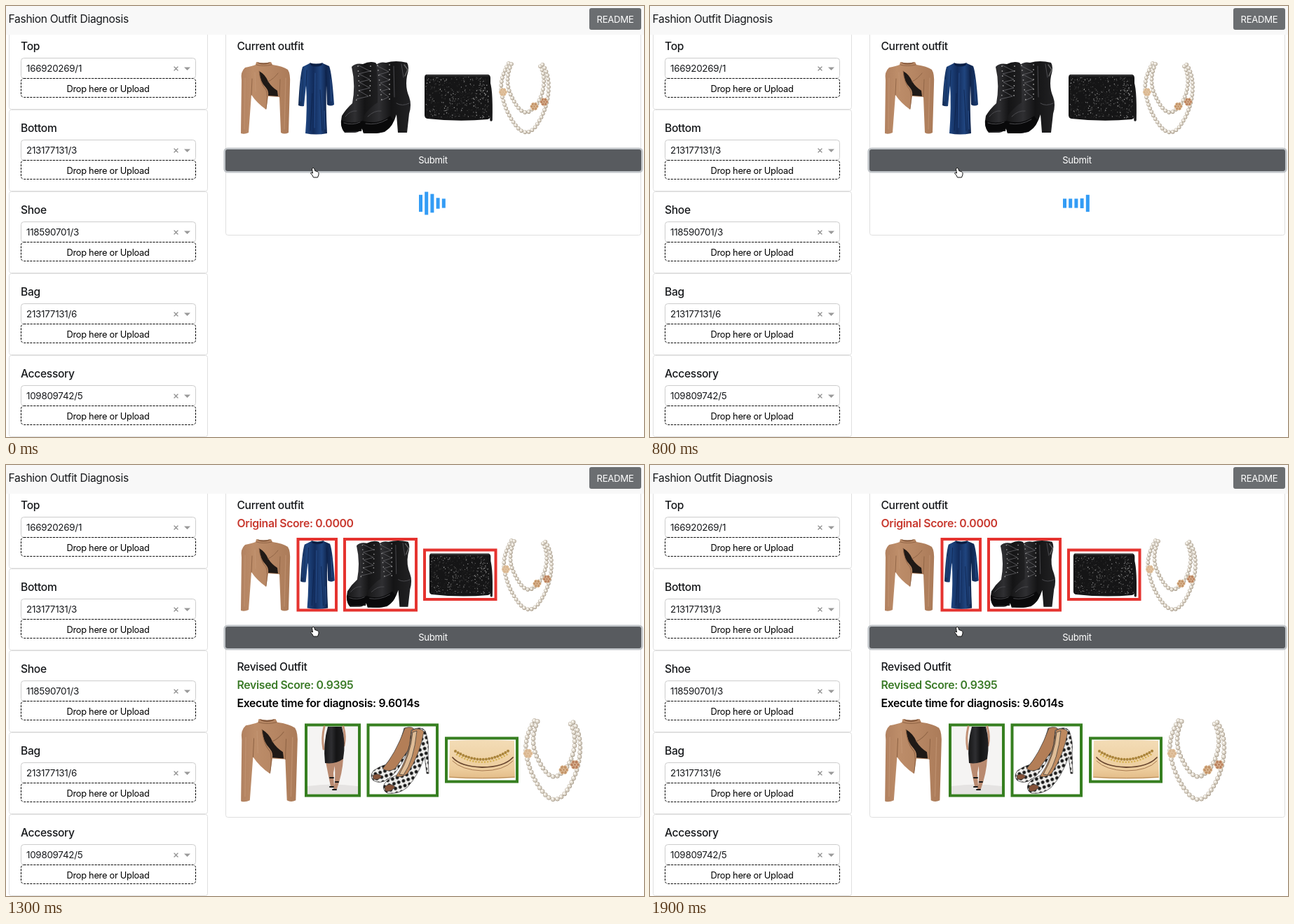
These frames come from a looping animation (910x616 px, 2 s). An HTML page:

```html
<!DOCTYPE html>
<html lang="en">
<head>
<meta charset="utf-8">
<title>Fashion Outfit Diagnosis</title>
<style>
  html, body { margin: 0; width: 100%; height: 100%; overflow: hidden; background: #fff; }
  svg { display: block; }
  text { font: 13.1px Inter, Roboto, sans-serif; letter-spacing: -.02em; fill: #16181b; }
  .title { font-size: 15.6px; }
  .head { font-size: 15.6px; font-weight: 500; }
  .score { font-size: 15.8px; font-weight: 600; }
  .value { font-size: 13.4px; }
  .light { fill: #fff; text-anchor: middle; }
  .mid { font-size: 12.8px; text-anchor: middle; fill: #000; }
  .card { fill: #fff; stroke: #dfdfdf; }
  .line { fill: none; stroke-linecap: round; stroke-linejoin: round; }
  .bead { fill: none; stroke-linecap: round; stroke-dasharray: 0 5.6; }
  .bad, .good { fill: #fff; stroke: #e5332f; stroke-width: 4; }
  .good { stroke: #367f20; }
</style>
</head>
<body>
<svg width="910" height="616" viewBox="0 0 910 616">
  <defs>
    <linearGradient id="camel">
      <stop offset="0" stop-color="#b18160"/><stop offset=".25" stop-color="#bd8d69"/>
      <stop offset=".6" stop-color="#b68663"/><stop offset="1" stop-color="#ab7b59"/>
    </linearGradient>
    <linearGradient id="velvet">
      <stop offset="0" stop-color="#10284f"/><stop offset=".2" stop-color="#1f4681"/>
      <stop offset=".42" stop-color="#122c5c"/><stop offset=".62" stop-color="#20457f"/>
      <stop offset=".78" stop-color="#10264f"/><stop offset="1" stop-color="#193a70"/>
    </linearGradient>
    <linearGradient id="leather">
      <stop offset="0" stop-color="#151516"/><stop offset=".35" stop-color="#2f2f32"/>
      <stop offset=".6" stop-color="#141415"/><stop offset="1" stop-color="#222224"/>
    </linearGradient>
    <linearGradient id="tan" x2="0" y2="1">
      <stop offset="0" stop-color="#f3dcb6"/><stop offset=".75" stop-color="#edcd9d"/>
      <stop offset="1" stop-color="#e3bb87"/>
    </linearGradient>
    <pattern id="dots" width="10" height="10" patternUnits="userSpaceOnUse" patternTransform="rotate(28)">
      <rect width="10" height="10" fill="#efeeec"/>
      <circle cx="2.5" cy="2.5" r="2.4" fill="#171717"/><circle cx="7.5" cy="7.5" r="2.4" fill="#171717"/>
    </pattern>

    <g id="jacket">
      <path fill="url(#camel)" d="M357 80Q367 83 378 80L380 84Q395 86 402 91Q406 97 405 112L403 181Q397 184 392 181L390 130L374 129L371 148Q358 139 350 127L346 181Q340 184 335 182L336 106Q334 94 341 88Q351 86 356 84Z"/>
      <path fill="#1f1916" d="M361 93Q370 98 374 108Q379 116 387 121L388 129L374 128Q375 122 371 117Q362 108 361 93Z"/>
      <path class="line" stroke="#8e6344" stroke-width=".9" d="M357 84Q367 87 379 84M361 93Q363 112 371 120Q374 127 371 147M350 127L351 104M390 130L391 105M374 108Q382 104 388 96"/>
      <path class="line" stroke="#c79a78" stroke-width="1.2" opacity=".6" d="M341 103L340 176M399 103L397 176M355 95L356 122"/>
      <path fill="#85593c" d="M358 80Q367 83 377 80L375 82Q367 85 360 82Z"/>
    </g>

    <g id="dress">
      <path fill="url(#velvet)" d="M433 82Q442 85 452 82L461 86Q465 96 468 141Q463 144 458 141L457 113Q456 145 458 182Q442 185 427 182Q430 145 428 113L425 143Q421 144 417 142Q419 100 423 87Z"/>
      <path fill="#0b1f45" d="M433 81Q442 84 452 81L450 85Q442 88 435 85Z"/>
      <path class="line" stroke="#0b1f45" opacity=".7" d="M429 92L428 115M456 92L457 115M437 125L434 178M448 120L451 178"/>
      <path class="line" stroke="#3563a8" opacity=".6" d="M441 96L440 174M421 105L420 136M463 105L464 136M454 150L455 176"/>
    </g>

    <g id="boots">
      <path fill="url(#leather)" d="M493 87Q498 81 509 83Q519 78 527 81L534 90L534 150L513 167Q507 180 498 181H483Q476 173 479 157Q485 147 494 139Q499 112 493 87Z"/>
      <path fill="url(#leather)" d="M528 84Q534 79 542 81Q556 77 572 81Q576 87 572 100Q569 116 575 130Q579 141 575 154L572 181H559L557 155Q552 172 540 180Q524 184 510 180Q506 168 510 157Q521 143 530 138Q531 110 528 84Z"/>
      <path fill="#09090a" d="M478 163Q490 170 509 164L507 179H482Q477 173 478 163ZM508 164Q530 171 548 157L553 164Q548 180 528 182H510Q506 173 508 164Z"/>
      <path class="line" stroke="#5e5e62" stroke-width=".9" d="M503 85L519 93L503 97L519 105L504 109L519 117L503 121L517 129L500 133M530 86L546 94L532 98L547 106L534 110L547 118L535 122L546 130L535 135"/>
      <path class="line" stroke="#999" stroke-width="1.8" stroke-dasharray="0 7" d="M502 86L504 120L499 137M520 86L519 132M530 85L536 135M547 84L547 134"/>
      <path class="line" stroke="#4c4c50" stroke-width="1" d="M484 158Q491 149 500 150M516 158Q525 149 535 150M557 139Q565 144 575 139M553 86L554 130M564 83L567 102M482 167Q494 171 505 166M513 168Q529 171 544 162"/>
      <path class="line" stroke="#666" stroke-width="1.5" d="M568 84L573 91L569 100"/>
    </g>

    <g id="bag">
      <path class="line" stroke="#19191a" stroke-width="3.5" d="M688 108Q693 115 692 163"/>
      <path fill="#151516" d="M599 98H688Q691 99 691 103V157Q691 161 687 162Q645 166 601 161Q597 160 597 156V102Q597 99 599 98Z"/>
      <g id="glitter"></g>
      <path class="line" stroke="#484849" d="M600 99.500H688"/>
    </g>

    <g id="necklace">
      <g id="strands">
        <path class="bead" d="M717 82Q702 106 708 130Q714 155 729 173Q742 188 755 173Q775 145 774 112Q773 92 763 81"/>
        <path class="bead" d="M721 83Q710 107 721 129Q734 157 746 151Q763 140 767 114Q769 94 759 82"/>
      </g>
      <g id="flowers"></g>
    </g>

    <g id="submit">
      <rect x="310.400" y="202.400" width="598.200" height="36.200" rx="5.500" fill="#c0c4c8"/>
      <rect x="313" y="205" width="593" height="31" rx="3" fill="#585b5f"/>
      <text class="light" x="609" y="225">Submit</text>
    </g>
  </defs>

  <g id="fields"></g>

  <g id="loading">
    <rect class="card" x="313.5" y="30.5" width="592" height="297" rx="3"/>
    <use href="#jacket"/><use href="#dress"/><use href="#boots"/><use href="#bag"/><use href="#necklace"/>
    <use href="#submit"/>
    <g id="bars" fill="#339cf5"></g>
  </g>

  <g id="result" visibility="hidden">
    <rect class="card" x="313.5" y="30.5" width="592" height="473" rx="3"/>
    <text class="score" x="329.5" y="89" style="fill:#c8382e">Original Score: 0.0000</text>
    <rect class="bad" x="416.5" y="106" width="54.5" height="101.500"/>
    <rect class="bad" x="483" y="106" width="102" height="101.500"/>
    <rect class="bad" x="597" y="121.500" width="101.500" height="70.500"/>
    <use href="#jacket" y="26"/>
    <use href="#dress" transform="translate(21.8 30.6) scale(.955)"/>
    <use href="#boots" transform="translate(41.5 34.5) scale(.93)"/>
    <use href="#bag" transform="translate(48.7 35.3) scale(.93)"/>
    <use href="#necklace" x="4" y="26"/>
    <use href="#submit" y="26"/>

    <text class="head" x="329.5" y="294">Revised Outfit</text>
    <text class="score" x="329.5" y="320" style="fill:#3b7b28">Revised Score: 0.9395</text>
    <text class="score" x="329.5" y="346" style="fill:#000">Execute time for diagnosis: 9.6014s</text>
    <use href="#jacket" transform="translate(-50.1 271.1) scale(1.15)"/>

    <rect class="good" x="428" y="371.5" width="76" height="101"/>
    <rect x="430" y="374" width="72" height="96" fill="#f5f4f3"/>
    <path fill="#e5e3e2" d="M430 459Q465 454 502 459V470H430Z"/>
    <path class="line" stroke="#c29176" stroke-width="3" d="M454 374Q450 390 453 406M481 374Q485 388 482 401"/>
    <path fill="#b98a70" d="M456 424H470L467 440L468 459H463Q459 440 456 424ZM468 420H481Q480 440 472 463H467Q471 448 468 420Z"/>
    <path fill="url(#leather)" d="M459 374H479Q485 396 481 420Q470 428 455 426Q452 398 459 374Z"/>
    <path class="line" stroke="#171717" stroke-width="2" d="M462 447H467M470 453H474M462 460H467M466 464H471"/>

    <rect class="good" x="516.5" y="371.5" width="98.5" height="101"/>
    <g stroke="#333" stroke-width=".7">
      <path fill="url(#dots)" d="M568 376Q561 406 542 428Q532 431 524 437Q518 445 524 451Q535 457 546 448Q560 438 571 413L585 383Q579 373 568 376Z"/>
      <path fill="#b37e57" d="M569 376Q580 372 584 380L574 407L555 434Q545 440 537 434Q555 414 569 376Z"/>
      <path fill="url(#dots)" d="M578 379Q592 372 598 380Q604 396 602 411L603 441H600L597 417Q588 444 572 461Q560 471 544 469Q535 464 540 455Q549 445 560 443Q575 422 578 379Z"/>
      <path fill="#bd895f" d="M579 379Q590 374 596 381Q591 412 573 441Q565 447 556 445Q575 420 579 379Z"/>
      <path fill="#dfbc96" d="M580 382Q577 414 561 442L567 443Q582 422 586 380Z"/>
      <path fill="#855239" d="M523 444Q530 439 536 445Q532 451 524 449ZM540 460Q548 453 555 460Q549 468 541 466Z"/>
    </g>

    <rect class="good" x="628" y="390.500" width="101" height="62"/>
    <path fill="url(#tan)" d="M633 394Q680 392 725 394L726 447Q680 450 632 447Z"/>
    <path class="line" stroke="#b78d5c" d="M633 446Q680 449 725 446"/>
    <path class="line" stroke="#aa843b" stroke-width="4" stroke-dasharray="0 4.2" d="M641 409Q680 433 717 408"/>
    <path class="line" stroke="#d6b254" stroke-width="2.6" stroke-dasharray="0 4.2" d="M643 414Q680 436 716 413"/>
    <path class="line" stroke="#69462f" stroke-width="1.8" d="M637 418Q648 431 679 432Q710 432 723 418"/>
    <path class="line" stroke="#a77950" d="M637 423Q650 436 679 437Q710 437 723 423"/>

    <use href="#necklace" transform="translate(-65.8 271.7) scale(1.143)"/>
  </g>

  <rect width="910" height="41" fill="#f8f8f8"/>
  <text class="title" x="3.5" y="24">Fashion Outfit Diagnosis</text>
  <rect x="832" y="3" width="74" height="31" rx="3" fill="#6b6e71"/>
  <text class="light" x="869" y="24">README</text>
  <text class="head" x="329.5" y="63">Current outfit</text>

  <path fill="#fff" stroke="#111" stroke-linejoin="round" d="M437 232Q438 230.500 439.500 232L441 236Q442 235 443 236.500Q444.500 236 445 237.500Q446.500 238 446 241L444.500 245H438.500L437 242L434.500 239Q435 237 437.500 239L436.500 233Z"/>
</svg>

<script>
const byId = id => document.getElementById(id);
const repeat = (n, draw) => Array.from({ length: n }, (_, i) => draw(i)).join('');

const fields = [
  ['Top', '166920269/1'], ['Bottom', '213177131/3'], ['Shoe', '118590701/3'],
  ['Bag', '213177131/6'], ['Accessory', '109809742/5']
];
byId('fields').innerHTML = fields.map(([label, value], i) => `
  <g transform="translate(0 ${117 * i})">
    <rect class="card" x="4.5" y="31.5" width="283" height="116" rx="3"/>
    <text class="head" x="21" y="63">${label}</text>
    <rect x="21.5" y="74.5" width="249" height="29" rx="4" fill="#fff" stroke="#ccc"/>
    <text class="value" x="29" y="94">${value}</text>
    <path class="line" stroke="#919191" stroke-width="1.4" d="M240 87l5 5m0-5l-5 5"/>
    <path fill="#999" d="M254 87.500h9l-4.500 4.500z"/>
    <rect x="21.500" y="103.500" width="249" height="27" rx="4" fill="#fff" stroke="#000" stroke-dasharray="3 1.6"/>
    <text class="mid" x="145.500" y="123">Drop here or Upload</text>
  </g>`).join('');

let seed = 17;
const random = () => (seed = seed * 16807 % 2147483647) / 2147483647;
byId('glitter').innerHTML = repeat(520, () => {
  const x = 599 + random() * 90, y = 101 + random() * 59, shade = 35 + random() ** 3 * 150 | 0;
  return `<circle cx="${x}" cy="${y}" r=".7" fill="rgb(${shade},${shade},${shade})"/>`;
});

// Each pearl is a rim, a body and a highlight.
const strands = byId('strands');
const pearls = strands.innerHTML;
strands.innerHTML = [['#a99d8c', 5.6, 0], ['#ddd6ca', 4.6, -.3], ['#fbf8f2', 2.4, -.8]]
  .map(([color, width, shift]) =>
    `<g stroke="${color}" stroke-width="${width}" transform="translate(${shift} ${shift})">${pearls}</g>`).join('');
byId('flowers').innerHTML = [[709, 123, '#d9b58f'], [753.5, 143.5, '#c39368'], [767.5, 137, '#b97f5c']]
  .map(([x, y, color]) => `<g transform="translate(${x} ${y})" fill="${color}" stroke="#e9cfad" stroke-width=".6">
    ${repeat(6, i => `<circle cx="3.500" r="2.300" transform="rotate(${60 * i})"/>`)}<circle r="1.800"/></g>`).join('');

byId('bars').innerHTML = repeat(5, i => `<rect x="${589 + 8.2 * i}" width="5"/>`);
const bars = [...byId('bars').children];

const LOOP = 2000, STEP = 100, DONE = 1200, CYCLE = 1200, RISE = 240;

function stretch(time) {
  const local = (time + CYCLE) % CYCLE;
  const u = Math.max(0, 1 - Math.abs(local - RISE) / RISE);
  return 0.4 + 0.6 * u * u * (3 - 2 * u);
}

function render(elapsed) {
  const time = Math.floor(elapsed % LOOP / STEP) * STEP;
  const done = time >= DONE;
  byId('loading').setAttribute('visibility', done ? 'hidden' : 'visible');
  byId('result').setAttribute('visibility', done ? 'visible' : 'hidden');
  // The spinner restarts just after the loop begins.
  const phase = time < STEP ? 350 : time - 50;
  bars.forEach((bar, i) => {
    const height = 33 * stretch(phase - 100 * i);
    bar.setAttribute('y', 282 - height / 2);
    bar.setAttribute('height', height);
  });
}

const start = performance.now();
function tick() {
  render(performance.now() - start);
  requestAnimationFrame(tick);
}
tick();
</script>
</body>
</html>
```
